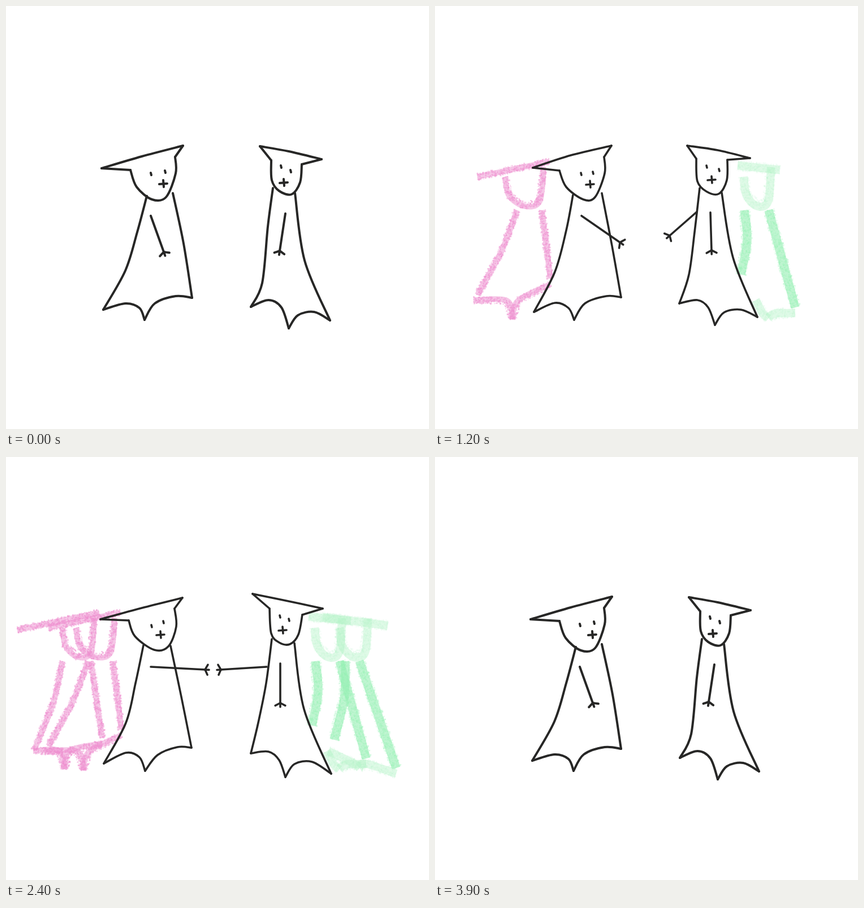
Write an HTML page with a canvas that moves like this. It is 748 by 748 pixels and loops after 4000 ms.

```html
<!DOCTYPE html>
<html lang="en">
<head>
<meta charset="utf-8">
<title>Two figures reaching out</title>
<style>
html, body { margin: 0; width: 100%; height: 100%; overflow: hidden; background: #fff; }
canvas { display: block; }
</style>
</head>
<body>
<canvas id="stage" width="748" height="748"></canvas>
<script>
const SIZE = 748;
const ctx = document.getElementById('stage').getContext('2d');

// Sections: head | body | arm | eyes and mouth; "/" turns a sharp corner
const leftDown = `169 287 240 266 313 247 / 299 267 / 300 296 283 338 258 342 231 320 220 290 / 169 287
  | 249 336 232 400 211 468 172 537 / 211 526 236 534 245 555 / 263 526 300 513 329 516 / 314 420 295 331
  | 256 371 279 435 | 256 297 281 293 278 314`;
const leftHalf = `173 286 240 264 312 247 / 299 267 / 300 296 283 338 262 342 232 320 220 291 / 173 286
  | 244 334 232 397 212 470 175 541 / 212 525 236 534 246 555 / 265 526 303 513 329 515 / 313 424 295 331
  | 259 371 327 418 | 258 297 279 295 274 315`;
const leftTouch = `167 287 240 267 312 249 / 298 268 / 301 300 287 335 262 341 228 317 217 289 / 167 287
  | 243 333 229 400 212 470 173 542 / 212 523 236 531 246 555 / 268 527 303 513 328 514 / 310 424 291 334
  | 256 371 352 376 | 257 299 278 292 273 314`;

const rightDown = `449 248 500 257 558 271 / 523 280 / 520 312 505 333 483 327 470 308 469 273 / 449 248
  | 472 322 463 390 453 490 433 532 / 464 520 487 533 500 570 / 516 547 545 541 573 556 / 528 450 511 331
  | 494 367 484 433 | 486 284 503 292 491 312`;
const rightHalf = `446 247 500 255 557 269 / 517 272 / 516 308 502 332 480 328 464 310 462 270 / 446 247
  | 468 322 459 400 449 475 432 526 / 464 520 483 533 495 564 / 511 542 541 537 570 550 / 527 445 507 330
  | 487 365 489 432 | 480 284 502 290 489 307`;
const rightTouch = `436 242 490 253 560 268 / 524 279 / 517 314 502 331 483 328 469 312 466 268 / 436 242
  | 470 322 460 400 446 470 433 524 / 464 521 483 536 494 566 / 510 543 541 539 575 560 / 527 446 510 329
  | 485 365 485 435 | 484 282 500 288 489 306`;

function parse(text) {
  return text.split('|').map(section => {
    let last = [];
    return section.split('/').map(part => {
      const n = part.trim().split(/\s+/).map(Number), pts = [...last];
      while (n.length) pts.push(n.splice(0, 2));
      last = pts.slice(-1);
      return pts;
    });
  });
}

const left = [leftDown, leftHalf, leftTouch].map(parse);
const right = [rightDown, rightHalf, rightTouch].map(parse);
// The right figure's second arm, unseen while it hangs down
const reach = [[[466, 380], [454, 440]], [[463, 364], [415, 406]], [[461, 371], [380, 376]]];

const blend = (a, b, k) => Array.isArray(a) ? a.map((v, i) => blend(v, b[i], k)) : a + (b - a) * k;
function poseAt(poses, level) {
  const i = Math.min(1, Math.floor(level));
  return blend(poses[i], poses[i + 1], level - i);
}

// Smooth curve through all points
function trace(c, pts) {
  c.beginPath();
  c.moveTo(...pts[0]);
  for (let i = 0; i < pts.length - 1; i++) {
    const a = pts[i - 1] || pts[i], b = pts[i], d = pts[i + 1], e = pts[i + 2] || d;
    c.bezierCurveTo(b[0] + (d[0] - a[0]) / 6, b[1] + (d[1] - a[1]) / 6,
      d[0] - (e[0] - b[0]) / 6, d[1] - (e[1] - b[1]) / 6, ...d);
  }
  c.stroke();
}

const line = (x, y, dx, dy) => trace(ctx, [[x, y], [x + dx, y + dy]]);

function drawArm(arm) {
  const [[x, y], [hx, hy]] = arm, dir = Math.atan2(hy - y, hx - x);
  trace(ctx, arm);
  for (const turn of [-1.1, 0, 1.1]) {
    const len = turn ? 10 : 7;
    line(hx, hy, len * Math.cos(dir + turn), len * Math.sin(dir + turn));
  }
}

function drawFigure([head, body, [arm], [[eye1, eye2, mouth]]]) {
  for (const s of [...head, ...body]) trace(ctx, s);
  drawArm(arm);
  for (const [x, y] of [eye1, eye2]) line(x, y - 2, 1, 4);
  const [x, y] = mouth;
  line(x - 7, y + 1, 14, -1);
  line(x, y - 6, 1, 12);
}

let seed = 7;
const random = () => (seed = (seed * 16807) % 2147483647) / 2147483647;

// Waxy stroke: a soft wash with grain scattered along it
function crayon(c, pts, { width, color, wash, grain }) {
  c.strokeStyle = c.fillStyle = color;
  c.lineWidth = width * 0.9;
  c.globalAlpha = wash;
  trace(c, pts);
  c.globalAlpha = grain;
  for (let i = 0; i < pts.length - 1; i++) {
    const [x, y] = pts[i], dx = pts[i + 1][0] - x, dy = pts[i + 1][1] - y;
    const len = Math.hypot(dx, dy);
    for (let n = 0; n < len * width / 4; n++) {
      const k = random(), off = (random() - 0.5) * width * 1.15, s = 1 + random() * 2;
      c.fillRect(x + dx * k - dy / len * off - s / 2, y + dy * k + dx / len * off - s / 2, s, s);
    }
  }
}

const pink = { width: 11, color: '#ee8fd0', wash: 0.5, grain: 0.42 };
const pale = { width: 16, color: '#b4f2c6', wash: 0.42, grain: 0.15 };
const green = { width: 17, color: '#94efb2', wash: 0.6, grain: 0.22 };

// hat ends, chin centre and half width, leg tops, feet, hem start, hem notch
const pinkEchoes = [
  [75, 302, 203, 275, 158, 34, 145, 189, 75, 511, 204, 482, 68, 137, 554],
  [20, 306, 165, 275, 128, 28, 100, 150, 50, 518, 170, 497, 48, 103, 552],
  [3, 317, 130, 285, 97, 27, 77, 120, 35, 515, 137, 490, 18, 78, 568]
];
const greenEchoes = [
  [535, 282, 610, 290, 570, 24, 547, 590, 541, 475, 637, 533, 567, 590, 552],
  [560, 283, 675, 298, 615, 25, 600, 625, 580, 500, 690, 550, 570, 625, 550],
  [620, 290, 712, 301, 660, 15, 635, 672, 620, 500, 735, 560, 580, 660, 555]
];

function drawEcho(c, echo, soft, strong, dip) {
  const [hx, hy, ex, ey, cx, w, l, r, lx, ly, rx, ry, hem, nx, ny] = echo;
  const chin = 354;
  crayon(c, [[hx, hy], [ex, ey]], soft);
  crayon(c, [[cx - w, 302], [cx - w * 0.8, 335], [cx, chin], [cx + w * 0.8, 345], [cx + w, 285]], soft);
  crayon(c, [[l, chin + 7], [(l + lx) / 2 + 8, (chin + ly) / 2], [lx, ly]], strong);
  crayon(c, [[r, chin + 7], [rx, ry]], strong);
  crayon(c, [[hem, 520], [nx - 10, ny - dip], [nx, ny]], soft);
  crayon(c, [[nx, ny], [nx + 10, ny - dip], [rx, ry + 10]], soft);
}

// Each layer holds all the echoes so far
const layers = pinkEchoes.map(() => document.createElement('canvas'));
layers.forEach((layer, i) => {
  layer.width = layer.height = SIZE;
  const c = layer.getContext('2d');
  if (i) c.drawImage(layers[i - 1], 0, 0);
  c.lineJoin = 'round';
  drawEcho(c, pinkEchoes[i], pink, pink, 33);
  drawEcho(c, greenEchoes[i], pale, green, 8);
});

function draw() {
  const tick = Math.floor(performance.now() % 4000 / 100);
  const beat = tick % 10, level = Math.min(beat, 9 - beat) / 2;
  // A new echo appears at every touch; the fourth clears them
  const echoes = Math.floor((tick + 5) / 10) % 4;

  ctx.fillStyle = '#fff';
  ctx.fillRect(0, 0, SIZE, SIZE);
  if (echoes) ctx.drawImage(layers[echoes - 1], 0, 0);

  ctx.strokeStyle = '#272726';
  ctx.lineCap = ctx.lineJoin = 'round';
  ctx.lineWidth = level ? 3.6 : 4;
  drawFigure(poseAt(left, level));
  drawFigure(poseAt(right, level));
  if (level) drawArm(poseAt(reach, level));
  requestAnimationFrame(draw);
}
draw();
</script>
</body>
</html>
```
